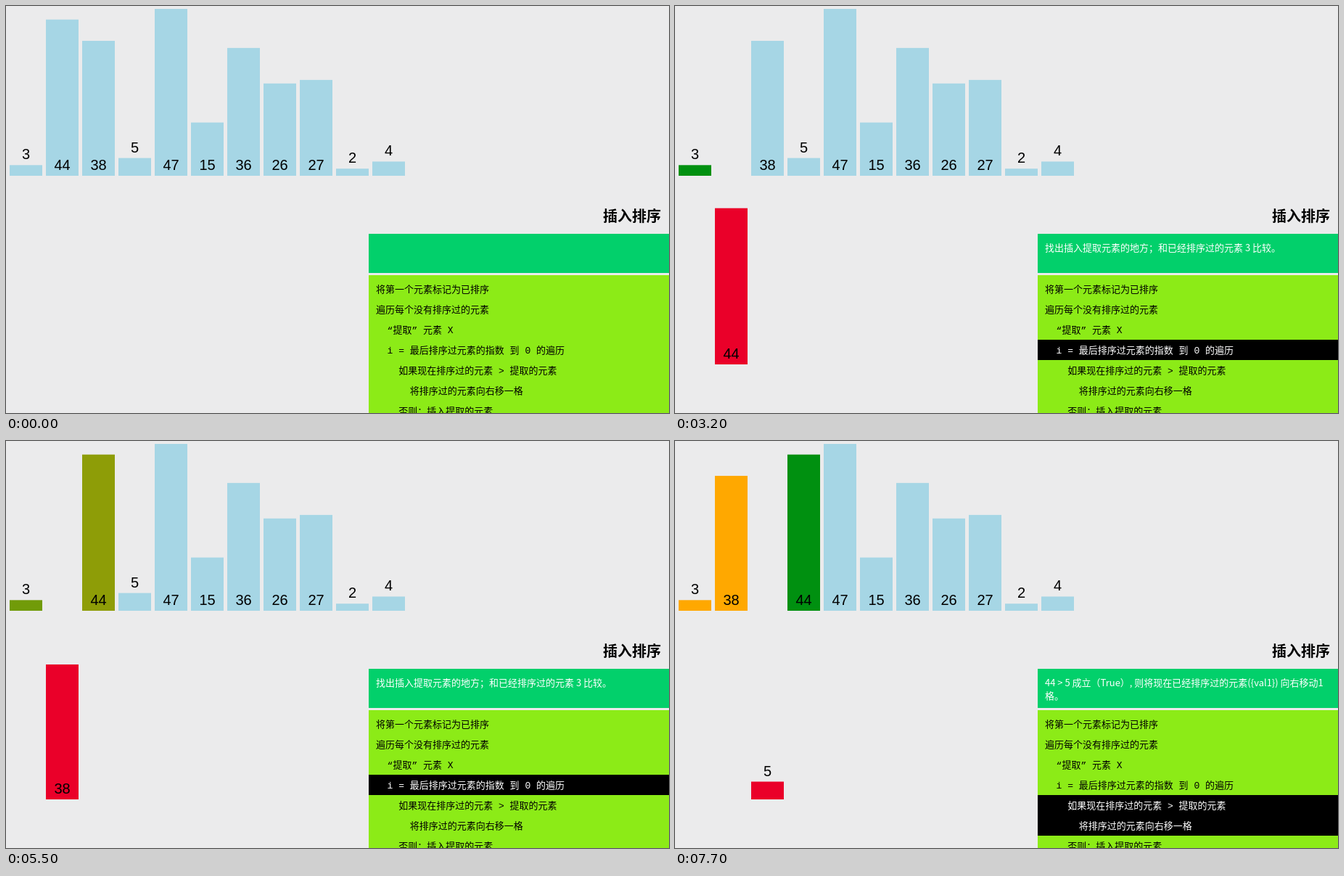
Recreate the animation shown at these times as an HTML page. Size 914 by 561 pixels, loop 8 s.

```html
<!DOCTYPE html>
<html lang="zh-CN">
<head>
<meta charset="utf-8">
<title>插入排序</title>
<style>
  html, body { margin: 0; width: 100%; height: 100%; overflow: hidden; background: #ebebec; }
  svg { display: block; width: 914px; height: 561px; }
  text { white-space: pre; }
  .label { font: 20px "Liberation Sans", Arial, sans-serif; text-anchor: middle; }
  .title { font: bold 20px "Noto Sans CJK SC", "Noto Sans CJK", sans-serif; }
  .status { font: 13px "Noto Sans CJK SC", "Noto Sans CJK", sans-serif; fill: #fff; }
  .code { font: 13px "Liberation Mono", "Noto Sans CJK SC", "Noto Sans CJK", monospace; }
</style>
</head>
<body>
<svg id="stage" viewBox="0 0 914 561"></svg>
<script>
const LOOP = 8000, TICK = 100, MOVE = 250;
const BASE = 234, DROP = 260, UNIT = 230 / 47;
const PLAIN = [166, 214, 229], SORTED = [255, 168, 0], COMPARED = [0, 144, 16], TAKEN = [234, 0, 41];
const values = [3, 44, 38, 5, 47, 15, 36, 26, 27, 2, 4];

// [indent in characters, text]
const code = [
  [0, '将第一个元素标记为已排序'],
  [0, '遍历每个没有排序过的元素'],
  [2, '“提取” 元素 X'],
  [2, 'i = 最后排序过元素的指数 到 0 的遍历'],
  [4, '如果现在排序过的元素 > 提取的元素'],
  [6, '将排序过的元素向右移一格'],
  [4, '否则：插入提取的元素'],
];

// Each step: highlighted code rows, status text, and new bar properties by value.
const markFirst = value => ({
  rows: [0], status: `将第一个元素 (${value}) 标记为已经排序过。`,
  bars: { [value]: { color: SORTED } },
});
const extract = value => ({
  rows: [1, 2], status: `提取第一个没有排序过的元素 (${value})。`,
  bars: { [value]: { drop: 1, color: TAKEN } },
});
const compare = (value, previous) => ({
  rows: [3], status: `找出插入提取元素的地方；和已经排序过的元素 ${value} 比较。`,
  bars: { ...(previous && { [previous]: { color: SORTED } }), [value]: { color: COMPARED } },
});
const shift = (value, taken, slot) => ({
  rows: [4, 5],
  status: `${value} > ${taken} 成立（True）, 则将现在已经排序过的元素({val1}) 向右移动1\n格。`,
  bars: { [value]: { slot: slot + 1 }, [taken]: { slot } },
});
const insert = (value, taken) => ({
  rows: [6], status: `${value} > ${taken} 不成立（False）, 在现在位置插入元素。`,
  bars: { [value]: { color: SORTED }, [taken]: { drop: 0, color: SORTED } },
});

// [visible from, progress already made by then, step], times in ms
const timeline = [
  [2000, 84, markFirst(3)],
  [2400, 30, extract(44)],
  [2900, 30, compare(3)],
  [3400, 30, insert(3, 44)],
  [3900, 30, extract(38)],
  [4500, 90, compare(44)],
  [4900, 30, shift(44, 38, 1)],
  [5500, 130, compare(3, 44)],
  [6000, 100, insert(3, 38)],
  [6500, 98, extract(5)],
  [6900, 75, compare(44)],
  [7500, 100, shift(44, 5, 2)],
];

const ease = t => t < 0.5 ? 4 * t ** 3 : 1 - 4 * (1 - t) ** 3;
const mix = (a, b, p) => Array.isArray(a) ? a.map((n, i) => mix(n, b[i], p)) : a + (b - a) * p;
const escapeText = s => s.replace(/&/g, '&amp;').replace(/</g, '&lt;').replace(/>/g, '&gt;');
const rect = (x, y, w, h, fill) => `<rect x="${x}" y="${y}" width="${w}" height="${h}" fill="${fill}"/>`;
const text = (kind, x, y, s, fill = '') =>
  `<text class="${kind}" x="${x}" y="${y}"${fill && ` fill="${fill}"`}>${escapeText(String(s))}</text>`;

function stateAt(time) {
  const bars = values.map((value, slot) => ({ value, slot, drop: 0, color: PLAIN }));
  let rows = [], status = '';
  for (const [start, lead, step] of timeline) {
    if (time < start) break;
    ({ rows, status } = step);
    const p = ease(Math.min(1, (time - start + lead) / MOVE));
    for (const bar of bars)
      for (const [key, goal] of Object.entries(step.bars[bar.value] || {}))
        bar[key] = mix(bar[key], goal, p);
  }
  return { bars, rows, status };
}

function drawBar({ value, slot, drop, color }) {
  const x = 5 + 50 * slot, height = value * UNIT, bottom = BASE + DROP * drop, top = bottom - height;
  return rect(x, top, 45, height, `rgb(${color.map(Math.round)})`)
    + text('label', x + 22.5, height < 40 ? top - 8 : bottom - 8, value);
}

function drawCode([indent, line], i, active) {
  const top = i ? 376 + 28 * i : 371;
  return (active ? rect(500, top, 414, 404 + 28 * i - top, '#000') : '')
    + text('code', 510 + 7.8 * indent, 395 + 28 * i, line, active ? '#fff' : '#000');
}

function draw(time) {
  const { bars, rows, status } = stateAt(time);
  document.getElementById('stage').innerHTML =
    rect(0, 0, 914, 561, '#ebebec')
    + bars.map(drawBar).join('')
    + text('title', 823, 297, '插入排序')
    + rect(500, 314, 414, 54, '#02d06b')
    + status.split('\n').map((line, i) => text('status', 510, 338 + 18 * i, line)).join('')
    + rect(500, 371, 414, 190, '#8ceb17')
    + code.map((line, i) => drawCode(line, i, rows.includes(i))).join('');
}

const origin = performance.now();
let shown = -1;
function frame() {
  const elapsed = (performance.now() - origin) % LOOP;
  const time = Math.floor(elapsed / TICK) * TICK;
  if (time !== shown) draw(shown = time);
  requestAnimationFrame(frame);
}
frame();
</script>
</body>
</html>
```
